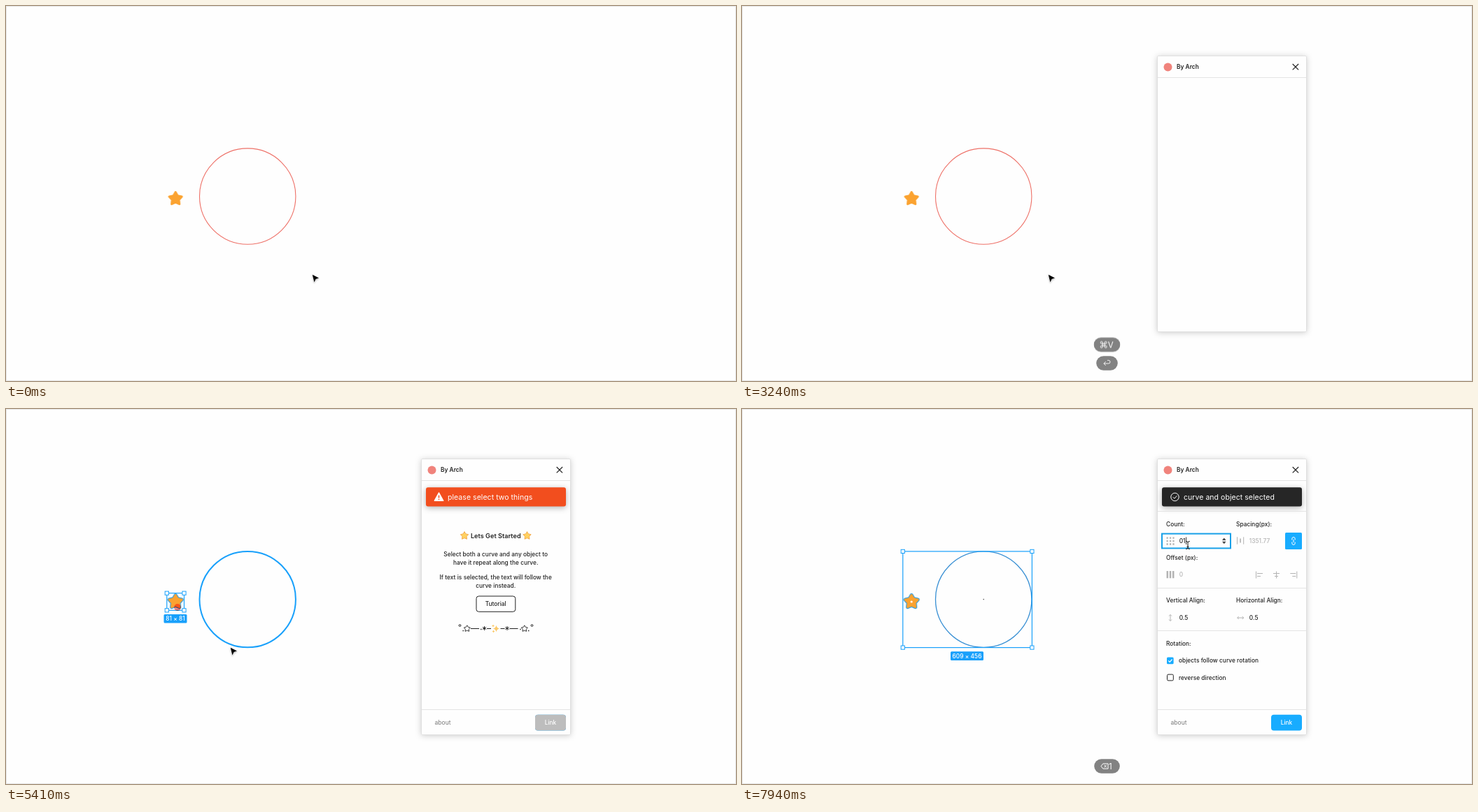
Write an HTML page that moves like this. It is 1043 px wide and 537 px high and loops after 8 s.

```html
<!DOCTYPE html>
<html lang="en">
<head>
<meta charset="utf-8">
<title>Repeat along a curve</title>
<style>
html, body { margin: 0; width: 100%; height: 100%; overflow: hidden; background: #fefefe; }
svg { display: block; width: 1043px; height: 537px; }
text { font: 500 8.3px Inter, sans-serif; letter-spacing: .005em; fill: #222; white-space: pre; }
.mid { text-anchor: middle; }
.bold { font-weight: 600; }
.menu { font-size: 9.75px; font-weight: 400; }
.status { font-size: 10.5px; font-weight: 400; }
.white { fill: #fff; }
.dim { fill: #b3b3b3; }
.line { stroke: #e4e4e4; }
.icon { fill: none; stroke: #b3b3b3; }
.dark { fill: none; stroke: #222; }
.blue { fill: #18a0fb; }
.frame { fill: none; stroke: #18a0fb; stroke-width: 1.2; }
.grip { fill: #fff; stroke: #18a0fb; }
.key rect { fill: #828282; }
.key path { fill: none; stroke: #fff; stroke-width: .9; }
.key text { fill: #fff; font-size: 11.5px; font-weight: 400; }
.card { fill: #fefefe; filter: drop-shadow(0 1px 4px rgba(0, 0, 0, .2)); }

/* 1% of the loop is 80 ms; keyframes hold unless marked linear or eased */
[id] { animation: 8s step-end infinite; }

#popup { animation-name: popup; }
@keyframes popup { 0% { opacity: 0 } 4.375% { opacity: 1 } 38.25% { opacity: 0 } }
#hint { animation-name: hint; }
@keyframes hint { 0% { opacity: 1 } 29.375% { opacity: 0 } }
#query { animation-name: query; }
@keyframes query { 0% { opacity: 0 } 29.375% { opacity: 1 } }
#caret { animation-name: caret; }
@keyframes caret {
  0% { opacity: 1; transform: none } 12.5% { opacity: 0 } 18.375% { opacity: 1 }
  25% { opacity: 0 } 29.375% { opacity: 1; transform: translateX(38px) }
}

#keySlash { animation-name: keySlash; }
@keyframes keySlash { 0% { opacity: 0 } 4.375% { opacity: .5 } 5.875% { opacity: 1 } 29.375% { opacity: 0 } }
#keyPaste { animation-name: keyPaste; }
@keyframes keyPaste {
  0% { opacity: 0; transform: translate(521.5px, 511.5px) }
  29.375% { opacity: .5 } 30.8% { opacity: 1 }
  38.25% { transform: translate(521.5px, 485px) }
  56% { opacity: 1; animation-timing-function: linear } 58.5% { opacity: 0 }
}
#keyEnter { animation-name: keyEnter; }
@keyframes keyEnter {
  0% { opacity: 0 } 38.25% { opacity: .5 } 39.75% { opacity: 1 }
  64% { opacity: 1; animation-timing-function: linear } 66.5% { opacity: 0 }
}
#keyErase { animation-name: keyErase; }
@keyframes keyErase { 0% { opacity: 0 } 95.625% { opacity: 1 } 98.4% { opacity: 0 } }
#keyEraseOne { animation-name: keyEraseOne; }
@keyframes keyEraseOne { 0% { opacity: 0 } 98.4% { opacity: 1 } }

#panel { animation-name: panel; }
@keyframes panel { 0% { opacity: 0 } 39.75% { opacity: 1 } }
#body { animation-name: body; }
@keyframes body { 0% { opacity: 0 } 42.625% { opacity: 1 } }
#intro, #linkOff { animation-name: intro; }
@keyframes intro { 0% { opacity: 1 } 75.6% { opacity: 0 } }
#settings, #both { animation-name: settings; }
@keyframes settings { 0% { opacity: 0 } 75.6% { opacity: 1 } }
#idle { animation-name: idle; }
@keyframes idle { 0% { opacity: 1 } 65% { opacity: 0 } }
#warn { animation-name: warn; }
@keyframes warn { 0% { opacity: 0 } 65% { opacity: 1 } 75.6% { opacity: 0 } }
#banner { animation-name: banner; }
@keyframes banner {
  0% { fill: #f24e1e; opacity: 0 }
  65% { opacity: 0; animation-timing-function: linear }
  67.5% { opacity: 1 }
  75.6% { fill: #f24e1e; animation-timing-function: linear }
  78.1%, 100% { fill: #262626; opacity: 1 }
}

#ring { animation-name: ring; }
@keyframes ring {
  0% { stroke: #ee7168; stroke-width: 1.1px }
  66.6% { stroke: #18a0fb; stroke-width: 2px }
  74.25% { stroke: #3990d4; stroke-width: 1.3px }
}
#glow { animation-name: glow; }
@keyframes glow { 0% { opacity: 0 } 60.6% { opacity: 1 } }
#pickStar { animation-name: pickStar; }
@keyframes pickStar { 0% { opacity: 0 } 64% { opacity: 1 } 74.25% { opacity: 0 } }
#pickBoth { animation-name: pickBoth; }
@keyframes pickBoth { 0% { opacity: 0 } 74.25% { opacity: 1 } }
#smart { animation-name: smart; }
@keyframes smart { 0% { opacity: 1 } 80% { opacity: 0 } }

#click { animation-name: click; fill: #ff8681; mix-blend-mode: multiply; }
@keyframes click {
  0% { r: 0; cx: 245px; cy: 284px }
  62% { r: 16.5px }
  65.6% { r: 16.5px; animation-timing-function: linear }
  68.5% { r: 0 }
  71.5% { r: 16.5px; cx: 327px; cy: 338px }
  76.1% { r: 16.5px; animation-timing-function: linear }
  79% { r: 0 }
  87.5% { r: 16.5px; cx: 637px; cy: 195px }
  89.4% { r: 16.5px; animation-timing-function: linear }
  92.3%, 100% { r: 0 }
}
#cursor { animation-name: cursor; }
@keyframes cursor {
  0% { transform: translate(437px, 384px) }
  47.5% { transform: translate(437px, 384px); animation-timing-function: ease-in }
  52.25% { transform: translate(386px, 357px); animation-timing-function: ease-out }
  61% { transform: translate(245px, 284px) }
  64.8% { transform: translate(245px, 284px); animation-timing-function: ease-in-out }
  67.5% { transform: translate(320px, 341px) }
  67.8% { transform: translate(320px, 341px); animation-timing-function: ease-out }
  69.4% { transform: translate(327px, 338px) }
  78% { transform: translate(327px, 338px); animation-timing-function: ease-in-out }
  83.9% { transform: translate(616px, 211px); animation-timing-function: ease-out }
  86.5%, 100% { transform: translate(637px, 195px) }
}
#arrow { animation-name: arrow; }
@keyframes arrow { 0% { opacity: 1 } 74.25% { opacity: 0 } 79.5% { opacity: 1 } 84% { opacity: 0 } }
#resize { animation-name: resize; }
@keyframes resize { 0% { opacity: 0 } 74.25% { opacity: 1 } 79.5% { opacity: 0 } }
#beam, #spin { animation-name: beam; }
@keyframes beam { 0% { opacity: 0 } 84% { opacity: 1 } }

#focus { animation-name: focus; }
@keyframes focus { 0% { opacity: 0 } 87.5% { opacity: 1 } }
#fieldCaret { animation-name: fieldCaret; }
@keyframes fieldCaret {
  0% { opacity: 0; transform: none } 87.5% { opacity: 1 } 94.125% { opacity: 0 }
  95.625% { opacity: 1 } 98.4% { transform: translateX(4px) }
}
#five { animation-name: five; }
@keyframes five { 0% { opacity: 1 } 95.625% { opacity: 0 } }
#zero { animation-name: keyErase; }
#one { animation-name: keyEraseOne; }
#gap { animation-name: gap; }
@keyframes gap { 0% { opacity: 1 } 98.4% { opacity: 0 } }
#gapOne { animation-name: keyEraseOne; }
</style>
</head>
<body>
<svg viewBox="0 0 1043 537">
  <defs>
    <path id="star" stroke-linejoin="round" d="M0-9.5 3.06-4.21 9.03-2.94 4.95 1.61 5.58 7.69 0 5.2-5.58 7.69-4.95 1.61-9.03-2.94-3.06-4.21Z"/>
    <path id="command" d="M-1.5 1.5V-3a1.5 1.5 0 1 0-1.5 1.5H3a1.5 1.5 0 1 0-1.5-1.5V3a1.5 1.5 0 1 0 1.5-1.5H-3a1.5 1.5 0 1 0 1.5 1.5Z"/>
    <path id="erase" d="M-2.2-3.6H5V3.6H-2.2L-5 0ZM-.6-1.7 2.8 1.7M2.8-1.7-.6 1.7"/>
    <path id="spark" d="M0-1Q.15-.15 1 0 .15.15 0 1-.15.15-1 0-.15-.15 0-1Z"/>
    <rect id="grip" x="-2.6" y="-2.6" width="5.2" height="5.2"/>
  </defs>

  <rect x=".5" y=".5" width="1042" height="536" fill="#fefefe" stroke="#e6e6e6"/>

  <!-- canvas objects -->
  <circle id="ring" cx="345.2" cy="272.6" r="68.7" fill="none"/>
  <g transform="translate(242.2 276)">
    <g id="glow"><use href="#star" fill="#1f9be8" stroke="#1f9be8" stroke-width="5"/></g>
    <use href="#star" fill="#fba331" stroke="#fba331" stroke-width="3"/>
  </g>

  <g id="pickStar">
    <rect class="frame" x="229.8" y="263.7" width="24.7" height="24.6"/>
    <g class="grip">
      <use href="#grip" x="229.8" y="263.7"/><use href="#grip" x="254.5" y="263.7"/>
      <use href="#grip" x="229.8" y="288.3"/><use href="#grip" x="254.5" y="288.3"/>
    </g>
    <rect class="blue" x="225.5" y="294" width="33" height="12.5" rx="1.5"/>
    <text class="mid white" x="242" y="303.3">81 × 81</text>
  </g>

  <g id="pickBoth">
    <rect class="frame" x="229.8" y="203.9" width="184.6" height="137.7"/>
    <g class="grip">
      <use href="#grip" x="229.8" y="203.9"/><use href="#grip" x="414.4" y="203.9"/>
      <use href="#grip" x="229.8" y="341.6"/><use href="#grip" x="414.4" y="341.6"/>
    </g>
    <rect class="blue" x="298" y="347.2" width="47" height="12.8" rx="1.5"/>
    <text class="mid white" x="321.5" y="356.6">609 × 456</text>
    <circle cx="242.2" cy="276" r="1.6" fill="#fff"/>
    <circle cx="345.2" cy="272.6" r=".8" fill="#555"/>
    <g id="smart">
      <circle cx="345.2" cy="272.6" r="3.6" fill="#fff" stroke="#e0646f" stroke-width="1.2"/>
      <path d="M265.2 271.5v9" stroke="#d9818d"/>
    </g>
  </g>

  <!-- plugin window -->
  <g id="panel">
    <rect class="card" x="593.5" y="71.5" width="213" height="395" rx="1.5" stroke="#d9d9d9" stroke-width=".7"/>
    <path class="line" d="M594 102.5h212"/>
    <circle cx="608.5" cy="87.5" r="6" fill="#f0837c"/>
    <text class="bold" x="621" y="90.4">By Arch</text>
    <path class="dark" stroke-width="1.2" d="m786.7 83 8.4 8.4m0-8.4-8.4 8.4"/>

    <g id="body">
      <rect id="banner" x="600" y="112.3" width="200" height="27.2" rx="3" style="filter:drop-shadow(0 2px 4px rgba(0,0,0,.3))"/>
      <g id="idle">
        <rect x="600.3" y="112.6" width="199.3" height="26.5" rx="3" fill="#fefefe" stroke="#8c8c8c" stroke-width="1.3"/>
        <path class="dark" d="M620.5 126h9" stroke-width="1.2"/>
        <text class="status" x="637" y="129.8" style="fill:#7d7d7d">nothing selected</text>
      </g>
      <g id="warn">
        <path fill="#fff" stroke="#fff" stroke-width="1.5" stroke-linejoin="round" d="m618.5 120 6.2 11.3h-12.4Z"/>
        <path stroke="#f24e1e" stroke-width="1.4" d="M618.5 123.5v4m0 1.2v1.5"/>
        <text class="status white" x="631" y="129.8">please select two things</text>
      </g>
      <g id="both">
        <circle cx="618.5" cy="126" r="5.7" fill="none" stroke="#fff"/>
        <path d="m615.8 126.2 2 2 3.6-3.9" fill="none" stroke="#fff"/>
        <text class="status white" x="631" y="129.8">curve and object selected</text>
      </g>

      <g id="intro">
        <g fill="#ffd261" stroke="#f3a94a" stroke-width="1.6">
          <use href="#star" transform="translate(655 181.5) scale(.62)"/>
          <use href="#star" transform="translate(744.5 181.5) scale(.62)"/>
        </g>
        <text class="mid bold" x="699.8" y="185" style="font-size:9.1px">Lets Get Started</text>
        <g class="mid">
          <text x="699.7" y="211">Select both a curve and any object to</text>
          <text x="699.7" y="223">have it repeat along the curve.</text>
          <text x="699.7" y="243.5">If text is selected, the text will follow the</text>
          <text x="699.7" y="255.5">curve instead.</text>
          <text x="699.7" y="282">Tutorial</text>
        </g>
        <rect class="dark" x="672" y="268" width="55.8" height="22.3" rx="3.5"/>
        <g class="dark">
          <path d="M664 314.5h12m11 0h6m13.5 0h6m7 0h12"/>
          <path d="M683.5 311v6m-2.6-4.5 5.2 3m0-3-5.2 3m35.1-4.5v6m-2.6-4.5 5.2 3m0-3-5.2 3"/>
          <circle cx="648.5" cy="310" r="1.4"/><circle cx="751.5" cy="310" r="1.4"/>
          <use href="#star" transform="translate(658.8 314.5) scale(.5)" stroke-width="1.8"/>
          <use href="#star" transform="translate(740.8 314.5) scale(.5)" stroke-width="1.8"/>
          <path d="M652.5 317.5h1.4m24.2-2h1.4m54.8 0h1.4m10.3 2h1.4" stroke-width="1.4"/>
        </g>
        <g fill="#fbc96a">
          <use href="#spark" transform="translate(700.5 314.5) scale(4.8)"/>
          <use href="#spark" transform="translate(696 310.5) scale(2)"/>
          <use href="#spark" transform="translate(696.5 318.5) scale(2)"/>
        </g>
      </g>

      <g id="settings">
        <path class="line" d="M594 146.5h212M594 256.5h212M594 317.5h212"/>
        <text x="606" y="167.5">Count:</text>
        <text x="706" y="167.5">Spacing(px):</text>
        <text x="606" y="216">Offset (px):</text>
        <text x="606" y="277.4">Vertical Align:</text>
        <text x="706" y="277.4">Horizontal Align:</text>
        <text x="606" y="339">Rotation:</text>

        <path class="icon" stroke-width="2.3" stroke-dasharray="2.3 2.1" d="M606.5 184.7h11.1m-11.1 4.4h11.1m-11.1 4.4h11.1"/>
        <g id="five"><text x="624.7" y="191.9">5</text></g>
        <g id="zero"><text x="624.7" y="191.9">0</text></g>
        <g id="one"><text x="624.7" y="191.9">01</text></g>
        <rect id="focus" x="600" y="178.6" width="98" height="20.8" fill="none" stroke="#18a0e8" stroke-width="2"/>
        <path id="spin" fill="#444" d="m686 188 2.8-3.5 2.8 3.5Zm0 1.8 2.8 3.5 2.8-3.5Z"/>
        <path id="fieldCaret" stroke="#222" stroke-width=".9" d="M630.6 183.5v10.5"/>

        <path class="icon" d="M707.5 183.3v10.4m9.2-10.4v10.4"/>
        <path class="icon" stroke-width="1.6" d="M712.1 185.5v6"/>
        <g id="gap"><text class="dim" x="724.8" y="191.9">205.55</text></g>
        <g id="gapOne"><text class="dim" x="724.8" y="191.9">1351.77</text></g>
        <rect x="776" y="177" width="24" height="24" rx="1.5" fill="#18acff"/>
        <path fill="none" stroke="#fff" d="M785.8 187.5v-1.7a2.2 2.2 0 0 1 4.4 0v1.7m0 3v1.7a2.2 2.2 0 0 1-4.4 0v-1.7m2.2-3.7v4.4"/>

        <path class="icon" stroke-width="2.5" d="M607.8 232v10.3m4.2-10.3v10.3m4.2-10.3v10.3"/>
        <text class="dim" x="624.7" y="240.3">0</text>
        <path class="icon" d="M734.5 232.5v10m1.5-7h8m-8 4h5M763.5 232.5v10m-4.5-7h9m-7 4h5M792.8 232.5v10m-1.5-7h-8m8 4h-5"/>

        <path class="icon" d="M612 294.5v9m-2-7 2-2 2 2m-4 5 2 2 2-2M707.7 299h9m-7-2-2 2 2 2m5-4 2 2-2 2"/>
        <text x="624.7" y="302">0.5</text>
        <text x="724.8" y="302">0.5</text>

        <rect x="607" y="355.6" width="9.6" height="9.6" rx="1.5" fill="#18acff"/>
        <path d="m609.2 360.4 2 2 3.3-3.9" fill="none" stroke="#fff" stroke-width="1.2"/>
        <text x="624" y="363.4">objects follow curve rotation</text>
        <rect class="dark" x="607.5" y="380.1" width="8.8" height="8.8" rx="1.5"/>
        <text x="624" y="387.7">reverse direction</text>
      </g>

      <path class="line" d="M594 430.5h212"/>
      <text x="612.5" y="452" style="fill:#777;font-weight:400;font-size:8.5px">about</text>
      <rect x="756" y="437.7" width="44" height="22.8" rx="4" fill="#18acff"/>
      <g id="linkOff"><rect x="756" y="437.7" width="44" height="22.8" rx="4" fill="#bdbdbd"/></g>
      <text class="mid white" x="778" y="452">Link</text>
    </g>
  </g>

  <!-- command search -->
  <g id="popup">
    <rect class="card" x="348" y="14.5" width="303.3" height="66.5" rx="2.5" style="filter:drop-shadow(0 2px 5px rgba(0,0,0,.28))"/>
    <path fill="#eeeeec" d="M348 51h303.3v24.5H348Z"/>
    <circle class="dark" cx="364.9" cy="31.8" r="4.6"/>
    <path class="dark" d="m368.2 35.1 3.4 3.4"/>
    <g id="hint"><text class="menu dim" x="384" y="36.5">Search menus, commands, and plugins</text></g>
    <g id="query"><text class="menu" x="384" y="36.5">By Arch</text></g>
    <path id="caret" stroke="#111" d="M384.5 26.5V39"/>
    <circle cx="365.8" cy="63.3" r="6" fill="#f0837c"/>
    <text class="menu" x="384" y="66.8">By Arch</text>
  </g>

  <!-- pressed keys -->
  <g class="key">
    <g id="keySlash"><g transform="translate(521.5 511.5)">
      <rect x="-16.7" y="-10.3" width="33.4" height="20.6" rx="10.3"/>
      <use href="#command" x="-3" fill="none" stroke="#fff"/>
      <text x="2.7" y="4.1">/</text>
    </g></g>
    <g id="keyPaste">
      <rect x="-18.9" y="-10.3" width="37.8" height="20.6" rx="10.3"/>
      <use href="#command" x="-4.8" fill="none" stroke="#fff"/>
      <text x="1.3" y="4.1">V</text>
    </g>
    <g id="keyEnter"><g transform="translate(521.5 511.5)">
      <rect x="-15.3" y="-10.3" width="30.6" height="20.6" rx="10.3"/>
      <path d="M-1.8-2.3-4.6.5l2.8 2.8M-4.6.5H2.2a2.2 2.2 0 0 0 0-4.6H.5"/>
    </g></g>
    <g id="keyErase"><g transform="translate(521.5 511.5)">
      <rect x="-15.3" y="-10.3" width="30.6" height="20.6" rx="10.3"/>
      <use href="#erase" fill="none" stroke="#fff"/>
    </g></g>
    <g id="keyEraseOne"><g transform="translate(521.5 511.5)">
      <rect x="-18.3" y="-10.3" width="36.6" height="20.6" rx="10.3"/>
      <use href="#erase" x="-3.5" fill="none" stroke="#fff"/>
      <text x="2.5" y="4.1">1</text>
    </g></g>
  </g>

  <!-- pointer -->
  <circle id="click" cx="245" cy="284" r="0"/>
  <g id="cursor">
    <path id="arrow" d="M.8.8 10 5.4 5.6 7 3.4 11.6Z" stroke="#fff" stroke-width=".8" paint-order="stroke" style="filter:drop-shadow(0 1px 1px rgba(0,0,0,.3))"/>
    <path id="resize" d="M0-6.5 2.8-3.3H.7V3.3H2.8L0 6.5-2.8 3.3H-.7V-3.3H-2.8Z" stroke="#fff" stroke-width=".8" paint-order="stroke"/>
    <path id="beam" d="M-2.8-5.5Q0-5.5 0-4 0-5.5 2.8-5.5M0-4V4.5M-2.8 5.5Q0 5.5 0 4 0 5.5 2.8 5.5M-1.5 2.2h3" fill="none" stroke="#111"/>
  </g>
</svg>
</body>
</html>
```
